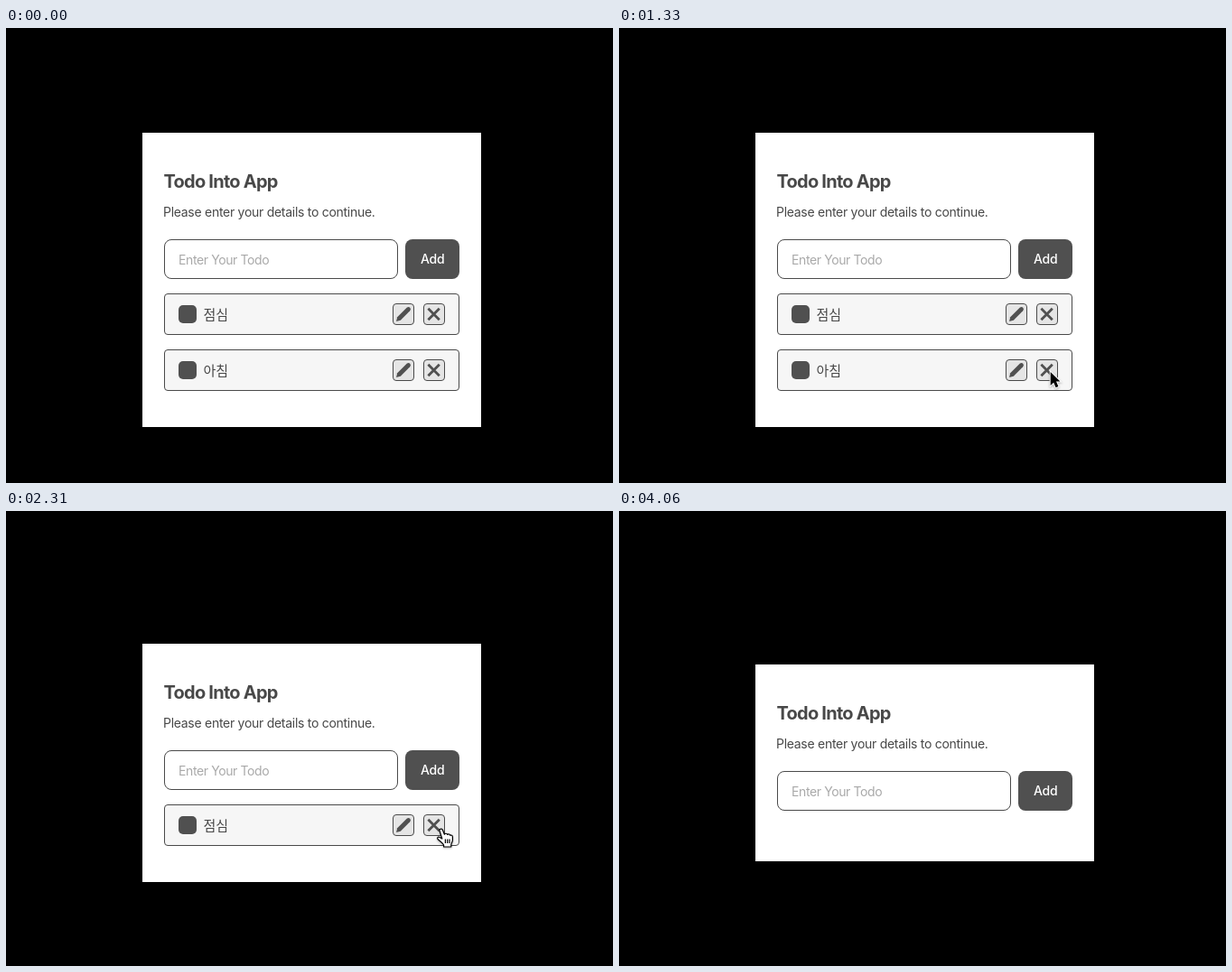
Recreate the animation shown at these times as an HTML page. Size 672 by 504 pixels, loop 4550 ms.

```html
<!DOCTYPE html>
<html lang="ko">
<head>
<meta charset="utf-8">
<title>Todo</title>
<style>
  html, body { margin: 0; width: 100%; height: 100%; overflow: hidden; background: #000; }
  svg { display: block; width: 672px; height: 504px; }
  text { font: 14px Inter, sans-serif; font-optical-sizing: none; letter-spacing: -.02em; fill: #484848; }
  .title { font-size: 20px; font-weight: 700; letter-spacing: -.038em; }
  .hint { fill: #a9a9a9; letter-spacing: -.028em; }
  .add { fill: #fff; font-weight: 500; }
  .label { font: 15px "Noto Sans CJK KR", "Noto Sans CJK", sans-serif; letter-spacing: 0; }
  .box { stroke: #4a4a4a; }
  .solid { fill: #505050; }
  .shadow { filter: drop-shadow(0 1px 1px rgba(0, 0, 0, .3)); }
</style>
</head>
<body>
<svg viewBox="0 0 672 504">
  <defs>
    <g id="iconButton"><rect class="box" x=".5" y=".5" width="23" height="23" rx="3.5" fill="#e5e5e5"/></g>
    <g id="row">
      <rect class="box" x=".5" y=".5" width="326" height="45" rx="3.5" fill="#f6f6f6"/>
      <rect class="solid" x="16" y="13" width="20" height="20" rx="5"/>
      <g transform="translate(253 11)">
        <use href="#iconButton"/>
        <path class="solid" d="M4 20 L5.2 15.2 L15.7 4.8 Q17.6 3.2 19.3 4.7 Q20.8 6.4 19.2 8.3 L8.8 18.8 Z"/>
      </g>
      <g transform="translate(287 11)">
        <use href="#iconButton"/>
        <path d="M5.4 5.8 L17.8 18.2 M17.8 5.8 L5.4 18.2" stroke="#505050" stroke-width="2.8"/>
      </g>
    </g>
  </defs>

  <rect width="672" height="504"/>
  <g id="card">
    <rect id="sheet" width="375" fill="#fff"/>
    <text class="title" x="23.5" y="61">Todo Into App</text>
    <text x="23" y="93">Please enter your details to continue.</text>
    <rect class="box" x="24.5" y="118.5" width="258" height="43" rx="7.5" fill="#fff"/>
    <text class="hint" x="40" y="146">Enter Your Todo</text>
    <rect class="solid" x="291" y="118" width="60" height="44" rx="8"/>
    <text class="add" x="308" y="145">Add</text>
    <g id="lunch" transform="translate(24 178)"><use href="#row"/><text class="label" x="43.5" y="28.5">점심</text></g>
    <g id="breakfast" transform="translate(24 240)"><use href="#row"/><text class="label" x="43.5" y="28.5">아침</text></g>
  </g>

  <g id="ring" fill="none">
    <circle r="37" stroke="#fff" stroke-width="5"/>
    <circle r="37" stroke="#000" stroke-width="3"/>
  </g>
  <g id="arrow" class="shadow">
    <path d="M.7 .9 V16 L4.2 12.7 L6.6 18.3 L9.4 17.1 L7 11.6 H11.4 Z" stroke="#fff" stroke-width="2" paint-order="stroke"/>
  </g>
  <g id="hand" class="shadow" stroke="#000" stroke-width="1.2" stroke-linejoin="round">
    <path fill="#fff" d="M4 3.2 C3.3 1.2 6.6 .2 7.5 2.4 L9.4 7.2 C10 5.8 12.4 6 12.8 7.5 C13.6 6.6 15.5 6.9 15.8 8.3 C17 7.7 18.4 8.5 18.4 10 V13.5 C18.4 15.5 17 17 16.8 18.5 V21 H8.6 V19 C7.5 17 4.5 14.8 2.6 13 C.8 11.4 2 9.6 3.8 10.2 L6.8 12 Z"/>
    <path d="M10.4 12.5 V17 M12.7 12.5 V17 M15 12.5 V17"/>
  </g>
</svg>
<script>
  const LOOP = 4550;
  const $ = id => document.getElementById(id);

  // start time, pointer shape, x, y
  const pointerSteps = [
    [0],
    [210, 'arrow', 503, 364], [280, 'arrow', 499, 367], [350, 'arrow', 494, 370], [420, 'arrow', 490, 373],
    [490, 'arrow', 486, 376], [560, 'arrow', 482, 378], [630, 'arrow', 479, 380], [700, 'arrow', 477, 381],
    [840, 'arrow', 477, 382], [910, 'arrow', 476, 383], [980, 'arrow', 476, 384],
    [1330, 'arrow', 477, 380], [1400, 'arrow', 471, 388],
    [1610, 'arrow', 472, 387], [1680, 'arrow', 474, 385], [1750, 'arrow', 475, 384],
    [2100, 'arrow', 476, 376], [2170, 'arrow', 477, 365], [2240, 'hand', 475, 354], [2310, 'hand', 476, 351],
    [3430, 'arrow', 481, 352],
    [3780, 'arrow', 470, 366], [3850, 'arrow', 444, 398], [3920, 'arrow', 405, 446], [3990, 'arrow', 363, 490],
    [4060]
  ];
  // start time, card top, card height, todo count
  const cardSteps = [[0, 116, 326, 2], [1890, 147, 264, 1], [3430, 170, 218, 0]];
  // start time, ring centre
  const ringSteps = [[0], [1820, 473.5, 382], [1890], [3290, 479, 350], [3430]];

  const stepAt = (steps, time) => steps.findLast(step => step[0] <= time);
  const show = (id, on) => $(id).style.visibility = on ? 'visible' : 'hidden';
  const place = (id, x, y) => $(id).setAttribute('transform', `translate(${x} ${y})`);

  function draw(time) {
    const [, top, height, count] = stepAt(cardSteps, time);
    place('card', 151, top);
    $('sheet').setAttribute('height', height);
    show('lunch', count > 0);
    show('breakfast', count > 1);

    const [, shape, x, y] = stepAt(pointerSteps, time);
    for (const id of ['arrow', 'hand']) show(id, id === shape);
    if (shape) place(shape, x, y);

    const [, cx, cy] = stepAt(ringSteps, time);
    show('ring', cx);
    if (cx) place('ring', cx, cy);
  }

  const start = performance.now();
  function tick() {
    draw((performance.now() - start) % LOOP);
    requestAnimationFrame(tick);
  }
  tick();
</script>
</body>
</html>
```
